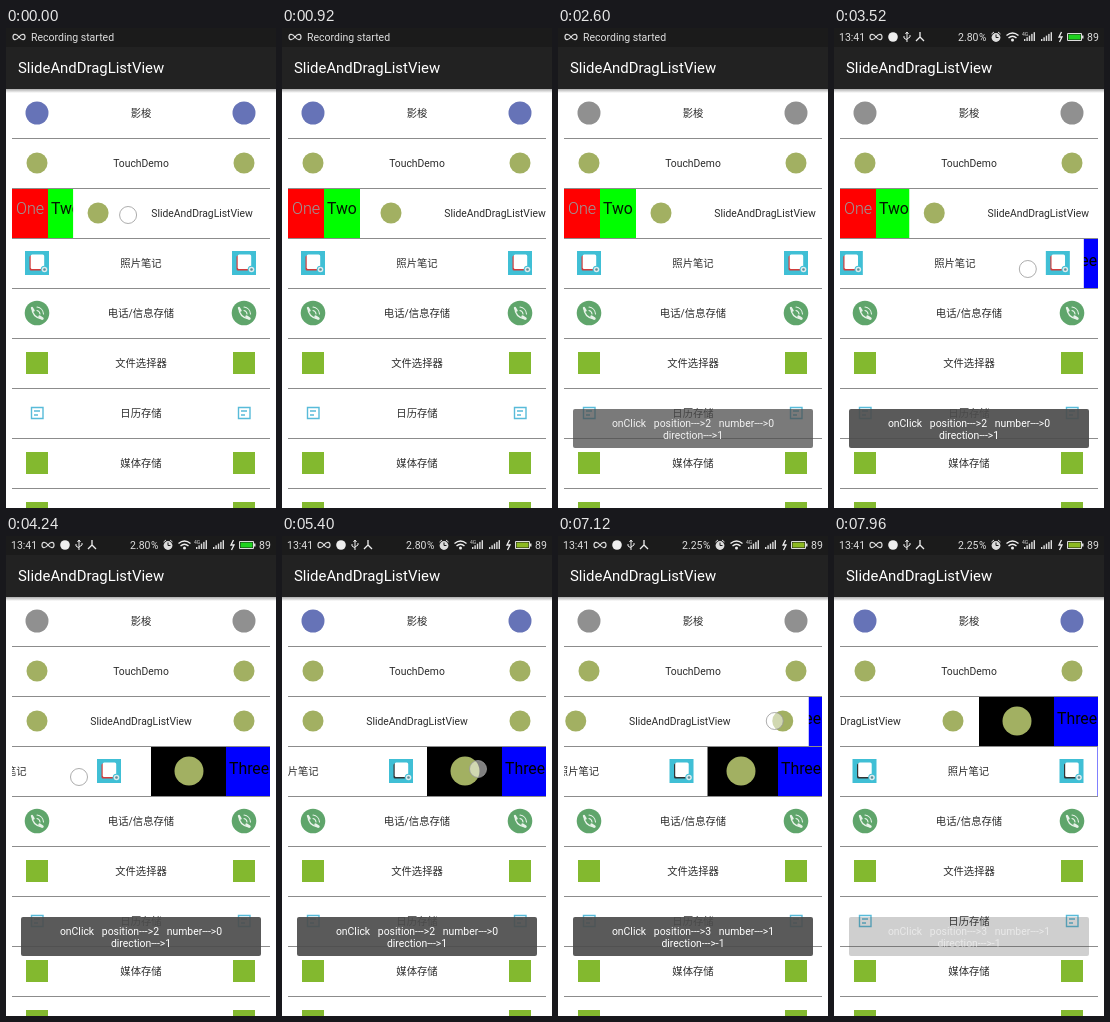
These frames come from a looping animation (270 by 480 pixels, 8 s). An HTML page with a canvas:

```html
<!DOCTYPE html>
<html lang="zh">
<head>
<meta charset="utf-8">
<title>SlideAndDragListView</title>
<style>
html, body { margin: 0; width: 100%; height: 100%; overflow: hidden; background: #fff; }
canvas { display: block; width: 270px; height: 480px; }
</style>
</head>
<body>
<canvas id="stage"></canvas>
<script>
const LOOP = 8000;
const FONT = 'Roboto, "Noto Sans CJK SC", "Noto Sans CJK", sans-serif';
const canvas = document.getElementById('stage');
const c = canvas.getContext('2d');
const dpr = window.devicePixelRatio || 1;
canvas.width = 270 * dpr;
canvas.height = 480 * dpr;

const out = p => 1 - (1 - p) ** 3;
const smooth = p => p * p * (3 - 2 * p);
const clamp = v => Math.max(0, Math.min(1, v));
const within = (t, a, b) => t >= a && t < b;

// keys: [time, value, easing into this key]
function track(t, keys) {
  let [t0, v0] = keys[0];
  for (const [t1, v1, ease = p => p] of keys) {
    if (t < t1) return v0 + (v1 - v0) * ease(clamp((t - t0) / (t1 - t0)));
    t0 = t1; v0 = v1;
  }
  return v0;
}

const slideA = [[0, 61], [420, 100], [720, 100], [1220, 72, out], [3460, 72], [3980, 0, smooth],
  [7040, 0], [7120, -13], [7600, -130], [7700, -130], [7960, -119, out]];
const slideB = [[3440, 0], [3520, -14], [4200, -135], [4500, -135], [5000, -119, out],
  [7060, -119], [7580, -.5, smooth]];

function rect(x, y, w, h, color) {
  c.fillStyle = color;
  c.fillRect(x, y, w, h);
}
function roundRect(x, y, w, h, r, color) {
  c.fillStyle = color;
  c.beginPath();
  c.roundRect(x, y, w, h, r);
  c.fill();
}
function disc(x, y, r, color) {
  c.fillStyle = color;
  c.beginPath();
  c.arc(x, y, r, 0, 7);
  c.fill();
}
function line(d, color, width = 1) {
  c.strokeStyle = color;
  c.lineWidth = width;
  c.stroke(new Path2D(d));
}
function text(s, x, y, size, color, align = 'left', weight = 400) {
  c.font = `${weight} ${size}px ${FONT}`;
  c.fillStyle = color;
  c.textAlign = align;
  c.fillText(s, x, y);
}

// Icons are centred on x, y
const icons = {
  plane(x, y, t) {
    const grey = within(t, 2500, 5060) || within(t, 7080, 7900);
    disc(x, y, 11.5, grey ? '#909090' : '#6673b7');
  },
  app(x, y) { disc(x, y, 10.5, '#a2b062'); },
  square(x, y) { rect(x - 11, y - 11, 22, 22, '#83b92f'); },
  note(x, y, t) {
    rect(x - 12, y - 12, 24, 24, '#40bfd5');
    roundRect(x - 7.5, y - 7.5, 14, 15, 1.5, t < 5000 ? '#d23c3c' : '#333');
    roundRect(x - 6.3, y - 8.5, 13.5, 14.5, 1.5, '#fff');
    disc(x + 7.5, y + 6.5, 3.8, '#40bfd5');
    disc(x + 7.5, y + 6.5, 2.8, '#dcebee');
    disc(x + 7.5, y + 6.5, 1.3, '#5f8f98');
  },
  phone(x, y) {
    disc(x, y, 12.3, '#5fa56b');
    c.save();
    c.translate(x, y);
    c.lineCap = 'round';
    line('M-5-5Q-5 4 5 6', '#e8f2e9', 1.4);
    line('M-5-5L-3.5-2.5M2.5 3.5L5.5 5.5', '#e8f2e9', 2.4);
    line('M0-2.5A4 4 0 0 1 3 1M0-6A7.5 7.5 0 0 1 6.5 1', '#e6f3e8', 1.1);
    c.restore();
  },
  calendar(x, y) {
    c.save();
    c.translate(x, y);
    line('M-5.5-5.5h11.5v11h-11.5z', '#58bbd9', 1.4);
    line('M-3-2h6M-3 2h4', '#58bbd9', 1.4);
    c.restore();
  }
};

const rows = [
  ['plane', '影梭'], ['app', 'TouchDemo'], ['app', 'SlideAndDragListView'],
  ['note', '照片笔记'], ['phone', '电话/信息存储'], ['square', '文件选择器'],
  ['calendar', '日历存储'], ['square', '媒体存储'], ['square', '']
];

function menu(y, off) {
  if (off > 0) {
    rect(6, y - 24, 36, 49, '#f00');
    rect(42, y - 24, 36, 49, '#0f0');
    text('One', 10, y + .5, 16.2, '#999', 'left', 300);
    text('Two', 45, y + .5, 15.8, '#021802');
  } else {
    rect(145, y - 24, 75, 49, '#000');
    rect(220, y - 24, 44, 49, '#00f');
    disc(183, y, 14.5, '#a2b062');
    text('Three', 223, y + 3.4, 15.8, '#000');
  }
}

function row([icon, label], y, off, t) {
  c.save();
  c.beginPath();
  c.rect(6, y - 24, 258, 49);
  c.clip();
  if (off) {
    menu(y, off);
    rect(6 + off, y - 24, 258, 49, '#fff');
    // Nothing lies between the menu and an overdragged row
    if (off > 72) rect(78, y - 24, off - 72, 49, '#fff');
    if (off < -119) rect(264 + off, y - 24, -119 - off, 49, '#fff');
  }
  c.translate(off, 0);
  icons[icon](31, y, t);
  icons[icon](238, y, t);
  text(label, 135, y + 4.2, 10.35, '#2c2c2c', 'center');
  c.restore();
  rect(6, y + 25, 258, 1, '#8c8c8c');
}

function infinity(x) {
  line(`M${x} 9C${x - 3} 5 ${x - 6} 6 ${x - 6} 9S${x - 3} 13 ${x} 9S${x + 6} 6 ${x + 6} 9S${x + 3} 13 ${x} 9`, '#ddd', 1.2);
}

function bars(x) {
  for (let i = 0; i < 5; i++) rect(x + i * 2.4, 11 - i * 1.7, 1.4, 2 + i * 1.7, '#ddd');
}

function header(t) {
  const shade = c.createLinearGradient(0, 60, 0, 65);
  shade.addColorStop(0, '#999');
  shade.addColorStop(1, '#fff');
  rect(0, 61, 270, 4, shade);
  rect(0, 0, 270, 61, '#222');
  rect(0, 0, 270, 19, '#1b1b1b');
  text('SlideAndDragListView', 12, 45.2, 14.9, '#fff');
  if (t < 2960) {
    infinity(13);
    text('Recording started', 25, 13, 10.5, '#ddd');
    return;
  }
  text('13:41', 5, 13, 10.5, '#ddd');
  infinity(42);
  disc(59, 9, 4.8, '#eee');
  line('M73 14V4M71.5 6L73 4L74.5 6M73 12L70 10V8M73 11L76 9V7', '#eee');
  line('M86 4V9L82 13M86 9L90 13', '#eee', 1.3);
  text(t < 6000 ? '2.80' : '2.25', 124, 13, 10.5, '#ddd');
  text('%', 145, 13, 10, '#ddd');
  disc(162, 9.5, 4.4, '#ddd');
  line('M162 6.5V9.5H164.5', '#1b1b1b');
  line('M157.5 6L160 4M166.5 6L164 4', '#ddd');
  line('M172.5 7.5Q178.5 2.5 184.5 7.5M174.5 10Q178.5 6.5 182.5 10', '#eee', 1.4);
  disc(178.5, 12, 1.5, '#eee');
  text('4G', 188, 7.5, 5, '#ddd');
  bars(190);
  bars(207);
  line('M227.5 4L225 9H228L225.5 14', '#eee', 1.3);
  line('M233.5 5.5H247.5V12.5H233.5Z', '#ddd');
  rect(234.5, 6.5, 12, 5, t < 5000 ? '#1fd31f' : '#8cb823');
  rect(248, 7.5, 1.5, 3, '#ddd');
  text('89', 253, 13, 10.5, '#ddd');
}

function toast(alpha, first, second) {
  if (alpha <= 0) return;
  c.globalAlpha = alpha;
  roundRect(15, 381, 240, 39, 2, 'rgba(77,77,77,.92)');
  c.globalAlpha = Math.sqrt(alpha);
  text(first, 135, 398.5, 10.4, '#fff', 'center');
  text(second, 135, 411, 10.4, '#fff', 'center');
  c.globalAlpha = 1;
}

function touch(x, y) {
  disc(x, y, 8.5, 'rgba(255,255,255,.5)');
  c.strokeStyle = '#999';
  c.lineWidth = .8;
  c.stroke();
}

function draw(t) {
  c.setTransform(dpr, 0, 0, dpr, 0, 0);
  rect(0, 0, 270, 480, '#fff');
  const a = track(t, slideA), b = track(t, slideB);
  rows.forEach((r, i) => row(r, 85 + i * 50, i === 2 ? a : i === 3 ? b : 0, t));
  header(t);

  toast(track(t, [[2480, 0], [2630, 1], [5420, 1], [5560, 0]]),
    'onClick   position--->2   number--->0', 'direction--->1');
  toast(track(t, [[5560, 0], [5720, 1], [7820, 1], [8020, 0]]),
    'onClick   position--->3   number--->1', 'direction--->-1');

  if (t < 720) touch(61 + a, 187);
  if (within(t, 2380, 2520)) touch(25, 185);
  if (within(t, 3400, 4500)) touch(208 + b, 241);
  if (within(t, 5380, 5490)) touch(196, 233);
  if (within(t, 7000, 7700)) touch(230 + a, 185);
}

const start = performance.now();
function frame() {
  draw((performance.now() - start) % LOOP);
  requestAnimationFrame(frame);
}
frame();
</script>
</body>
</html>
```
